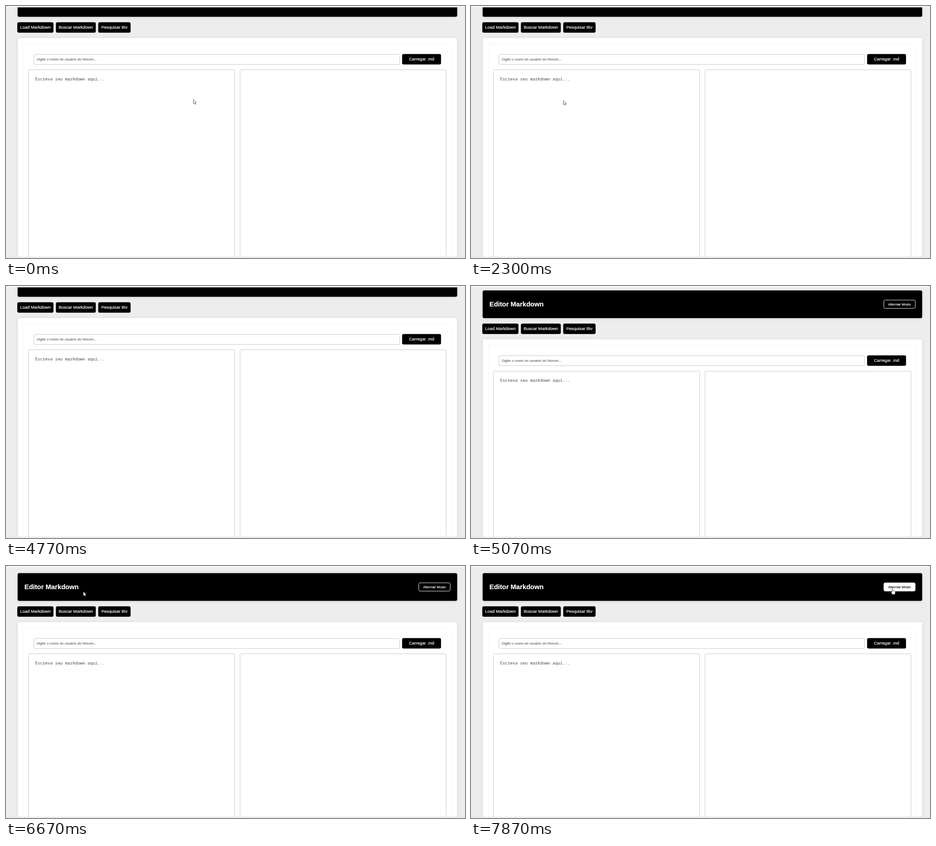
An HTML page with a canvas that plays this animation: 1009x555 px, repeating every 8000 ms.

```html
<!DOCTYPE html>
<html lang="pt-BR">
<head>
<meta charset="utf-8">
<title>Editor Markdown</title>
<style>
  html, body { margin: 0; width: 100%; height: 100%; overflow: hidden; background: #ededed; }
  canvas { display: block; width: 1009px; height: 555px; }
</style>
</head>
<body>
<canvas id="stage" width="1009" height="555"></canvas>
<script>
const ctx = document.getElementById('stage').getContext('2d');
const LOOP = 8000, FPS = 30, LAST_STEP = 236;
const SANS = '"Liberation Sans", Arial, sans-serif';
const MONO = '"Noto Sans Mono", "DejaVu Sans Mono", monospace';
const HINT = '#6c6c6c', LINE = '#c9c9c9';

const point = (x, y) => ({ x, y });
const clamp = v => Math.min(1, Math.max(0, v));
const smooth = v => (v = clamp(v), v * v * (3 - 2 * v));
const mix = (a, b, k) => a + (b - a) * k;

// The pointer glides between places; each glide may bow sideways.
const home = point(411.5, 205.5);
const away = point(1015, 130);
const straight = point(0, 0);
const glides = [
  { from: 0, to: 800, end: point(586, 178), bow: straight },
  { from: 1700, to: 2300, end: point(202.5, 207.5), bow: straight },
  { from: 2300, to: 3400, end: point(419.5, 93.5), bow: point(560, 0) },
  { from: 3400, to: 4400, end: away, bow: point(0, 148) },
  { from: 5350, to: 6670, end: point(169.5, 56), bow: point(0, 75) },
  { from: 6670, to: 7700, end: point(925.5, 50), bow: point(0, 105) }
];

function pointerAt(ms) {
  let { x, y } = home;
  for (const { from, to, end, bow } of glides) {
    if (ms < from) break;
    const k = smooth((ms - from) / (to - from));
    const swing = Math.sin(Math.PI * k);
    x = mix(x, end.x, k) + bow.x * swing;
    y = mix(y, end.y, k) + bow.y * swing;
  }
  return point(x, y);
}

function box(x, y, w, h, r, fill, stroke) {
  ctx.beginPath();
  ctx.roundRect(x, y, w, h, r);
  if (fill) { ctx.fillStyle = fill; ctx.fill(); }
  if (stroke) { ctx.strokeStyle = stroke; ctx.lineWidth = 1; ctx.stroke(); }
}

function shadowBox(x, y, w, h, r, fill) {
  ctx.save();
  ctx.shadowColor = 'rgba(0,0,0,0.12)';
  ctx.shadowBlur = 6;
  ctx.shadowOffsetY = 1;
  box(x, y, w, h, r, fill);
  ctx.restore();
}

function label(str, x, y, font, color, align = 'left') {
  ctx.font = font;
  ctx.textAlign = align;
  ctx.fillStyle = ctx.strokeStyle = color;
  ctx.lineWidth = 0.2;
  ctx.fillText(str, x, y);
  ctx.strokeText(str, x, y);
}

function makeButton(name, x, y, w) {
  const h = 23;
  return {
    draw() {
      box(x, y, w, h, 3.5, '#000');
      label(name, x + w / 2, y + 14.3, `9.45px ${SANS}`, '#fff', 'center');
    },
    contains: (px, py) => px >= x && px <= x + w && py >= y && py <= y + h
  };
}

const buttons = [
  makeButton('Load Markdown', 24.8, 35.7, 79.6),
  makeButton('Buscar Markdown', 109.7, 35.7, 87.7),
  makeButton('Pesquisar Biv', 202.7, 35.7, 71.2),
  makeButton('Carregar .md', 870.7, 105.7, 85.6)
];

const overToggle = (x, y) => x >= 907 && x <= 977 && y >= -16 && y <= 3;

function drawPage(hover) {
  shadowBox(25.6, -37.2, 966.2, 61, 3.5, '#000');
  label('Editor Markdown', 40.6, -2, `bold 14.7px ${SANS}`, '#fff');
  box(907.5, -16, 69, 18.3, 3, `rgba(255,255,255,${hover})`, '#eee');
  const ink = Math.round(mix(255, 20, hover));
  label('Alternar Modo', 942, -4.2, `7.95px ${SANS}`, `rgb(${ink},${ink},${ink})`, 'center');

  shadowBox(25.8, 70.5, 965.8, 620, 3, '#fff');
  box(38.5, 83.5, 940.5, 600, 2, null, '#f3f3f3');
  box(61.5, 106.5, 804, 22, 2, '#fff', LINE);
  label('Digite o nome de usuário do Nivrum...', 67.5, 119.7, `7.85px ${SANS}`, HINT);
  for (const x of [49.5, 514.5]) box(x, 140.5, 453, 540, 2, '#fff', LINE);
  label('Escreva seu markdown aqui...', 64, 164.3, `9.16px ${MONO}`, HINT);

  for (const button of buttons) button.draw();
}

const arrow = new Path2D('M.5 .5V9.6L2.5 7.8L4 11L5.6 10.3L4.2 7.2L7 7Z');
const hand = new Path2D('M0 1Q1 -.6 2 1L2.2 4.4L6.3 5.3Q7.6 5.8 7.3 7.8L6.2 12.5H1L-2.6 8Q-2.4 6.4 0 8Z');

function drawPointer({ x, y }, scroll) {
  if (x > 986) return;
  const pageY = y - scroll;
  const pressable = overToggle(x, pageY) || buttons.some(b => b.contains(x, pageY));
  const shape = pressable ? hand : arrow;
  ctx.save();
  ctx.translate(x, y);
  ctx.fillStyle = '#fff';
  ctx.strokeStyle = '#444';
  ctx.lineWidth = 0.85;
  ctx.lineJoin = 'round';
  ctx.fill(shape);
  ctx.stroke(shape);
  ctx.restore();
}

function strip(y, h, color) {
  ctx.fillStyle = color;
  ctx.fillRect(0, y, 1009, h);
}

function render(now) {
  const step = Math.min(LAST_STEP, Math.floor((now % LOOP) * FPS / 1000 + 0.01));
  const ms = step * 1000 / FPS;
  const scroll = Math.round(53 * smooth((ms - 4940) / 160));

  strip(0, 555, '#ededed');
  ctx.save();
  ctx.beginPath();
  ctx.rect(0, 3, 1009, 549.5);
  ctx.clip();
  ctx.translate(0, scroll);
  drawPage(smooth((ms - 7590) / 200));
  ctx.restore();

  strip(0, 2.5, '#f6f6f6');
  strip(552.5, 1.2, '#dedede');
  strip(553.7, 1.3, '#f3f3f3');
  drawPointer(pointerAt(ms), scroll);
}

const start = performance.now();
function tick() {
  render(performance.now() - start);
  requestAnimationFrame(tick);
}
tick();
</script>
</body>
</html>
```
